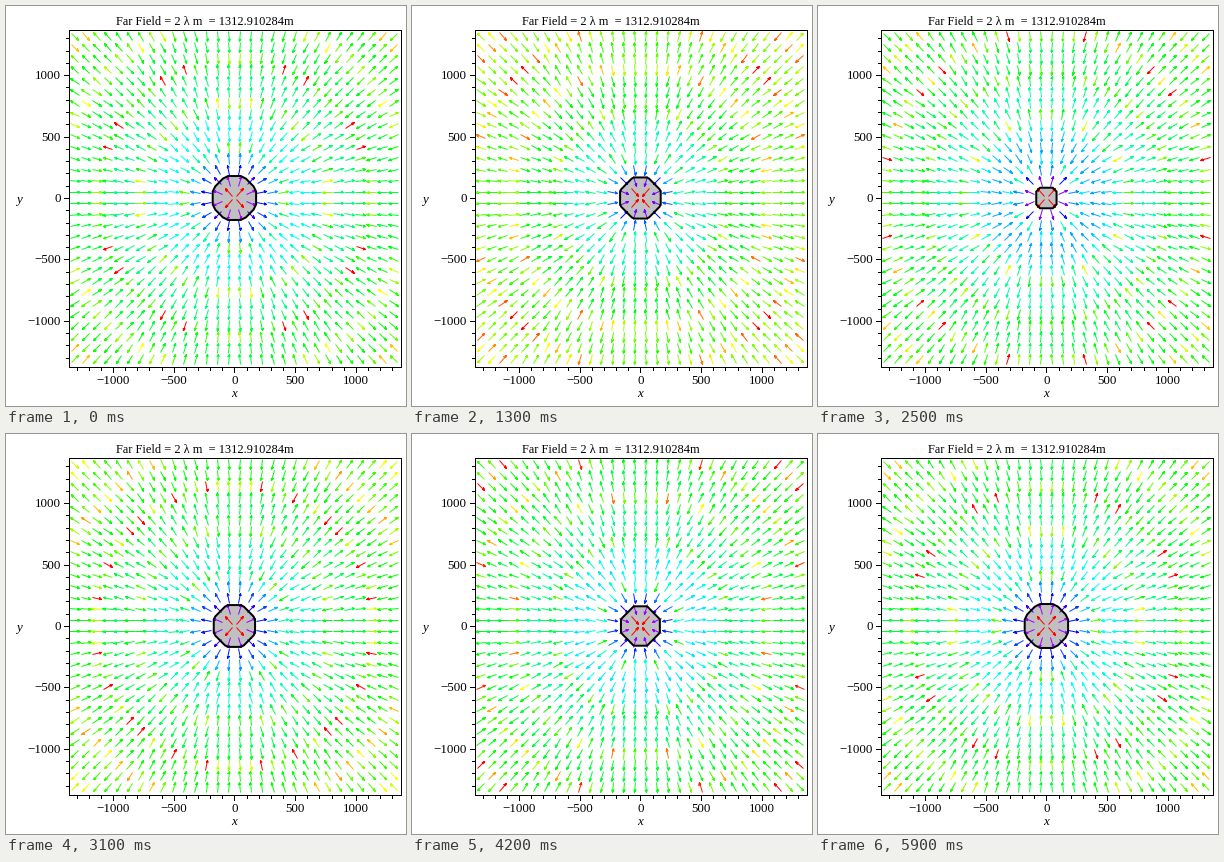
Write a matplotlib script that moves like this. It is 400 by 400 pixels and loops after 6000 ms.

```python
import numpy as np
import matplotlib as mpl
import matplotlib.pyplot as plt
from matplotlib.animation import FuncAnimation
from matplotlib.collections import LineCollection
from matplotlib.colors import hsv_to_rgb
from matplotlib.patches import Polygon

mpl.rcParams.update({
    "font.family": "Liberation Serif",
    "path.simplify": False,
})

FRAMES, CYCLES = 60, 2
FREQ = 457000                # Hz
FAR = 2 * 3e8 / FREQ         # two wavelengths, with rounded light speed
K = 2 * np.pi * FREQ / 299792458
GRID = 30
STEP = 2 * FAR / (GRID - 1)
HALF = 0.46 * STEP           # half an arrow's length
SOURCE = 191                 # largest radius of the pulsating source
NODE = FAR / 25              # half a cell of the contour grid

LEFT, RIGHT, TOP, BOTTOM = 62.5, 394.5, 23.5, 360.5
CX, CY, SX, SY = 228.4, 192.0, 0.1214, 0.1229


def px(x, y):
    return np.stack([CX + SX * x, CY - SY * y], axis=-1)


def centre(p):
    """Move points to the middle of their pixel."""
    return np.floor(p) + 0.5


axis = np.linspace(-FAR, FAR, GRID)
gx, gy = (g.ravel() for g in np.meshgrid(axis, axis))
rad = np.hypot(gx, gy)
ux, uy = gx / rad, gy / rad


def radial_field(phase):
    x = K * rad
    wave = (3 / x**2 - 3j / x - 1) * np.exp(1j * (x - phase))
    return wave.real / x**2


def arrows(sign):
    dx, dy = ux * sign * HALF, uy * sign * HALF
    tail = centre(px(gx - dx, gy - dy))
    tip = centre(px(gx + dx, gy + dy))
    bx, by = gx + 0.5 * dx, gy + 0.5 * dy
    barb1 = px(bx - 0.2 * dy, by + 0.2 * dx)
    barb2 = px(bx + 0.2 * dy, by - 0.2 * dx)
    return np.stack([tail, tip, barb1, tip, barb2], axis=1)


def hues(field):
    level = np.log(np.abs(field) + 1e-12)
    hue = (level - level.min()) / np.ptp(level)
    return hsv_to_rgb(np.stack([hue, np.ones_like(hue), np.ones_like(hue)], axis=-1))


def source_outline(r):
    """Circle as traced by linear interpolation on a coarse grid."""
    corner = []
    for c in (NODE, 3 * NODE):
        a = NODE
        if a * a + c * c >= r * r:
            continue
        while (a + 2 * NODE) ** 2 + c * c < r * r:
            a += 2 * NODE
        low = a * a + c * c - r * r
        high = (a + 2 * NODE) ** 2 + c * c - r * r
        cross = a + 2 * NODE * low / (low - high)
        corner += [(cross, c), (c, cross)]
    pts = np.array([(sx * x, sy * y) for x, y in corner
                    for sx in (1, -1) for sy in (1, -1)])
    if len(pts) == 0:
        return None
    pts = pts[np.argsort(np.arctan2(pts[:, 1], pts[:, 0]))]
    return px(pts[:, 0], pts[:, 1])


fig = plt.figure(figsize=(4, 4), dpi=100, facecolor="white")
ax = fig.add_axes([0, 0, 1, 1])
ax.set(xlim=(0, 400), ylim=(400, 0))
ax.axis("off")

PX = 0.72  # points per pixel


def line(xs, ys):
    ax.plot(xs, ys, color="black", lw=PX, antialiased=False, zorder=4)


def label(x, y, text, size=13, ha="center", **kw):
    ax.text(x, y, text, fontsize=size * PX, ha=ha, va="baseline", **kw)


line([LEFT, RIGHT, RIGHT, LEFT, LEFT], [TOP, TOP, BOTTOM, BOTTOM, TOP])
for v in range(-1300, 1301, 100):
    size = 5 if v % 500 == 0 else 3
    tx, ty = px(v, v)
    line([tx, tx], [BOTTOM, BOTTOM + size])
    line([LEFT, LEFT - size], [ty, ty])
    if v % 500 == 0:
        name = str(v).replace("-", "\u2212")
        label(tx, 378, name)
        label(55, ty + 4, name, ha="right")

label(110, 19, "Far Field = 2 λ m  = 1312.910284m", 12.4, ha="left")
label(228, 391, "x", style="italic")
label(13, 197, "y", style="italic")


def source_patch(**kw):
    return ax.add_patch(Polygon([(0, 0), (1, 0), (0, 1)], closed=True, **kw))


source = (source_patch(facecolor="#c0c0c0", edgecolor="none", zorder=2),
          source_patch(fill=False, edgecolor="black", lw=2 * PX, zorder=5))
field_lines = LineCollection([], linewidths=PX, zorder=3)
ax.add_collection(field_lines)


def draw(i):
    phase = 2 * np.pi * CYCLES * i / (FRAMES - 1)
    field = radial_field(phase)
    field_lines.set_segments(arrows(np.sign(field)))
    field_lines.set_color(hues(field))
    outline = source_outline(SOURCE * abs(np.cos(phase)))
    for patch in source:
        patch.set_visible(outline is not None)
        if outline is not None:
            patch.set_xy(outline)
    return field_lines, *source


anim = FuncAnimation(fig, draw, frames=FRAMES, interval=100,
                     repeat=True, repeat_delay=0)
plt.show()
```
